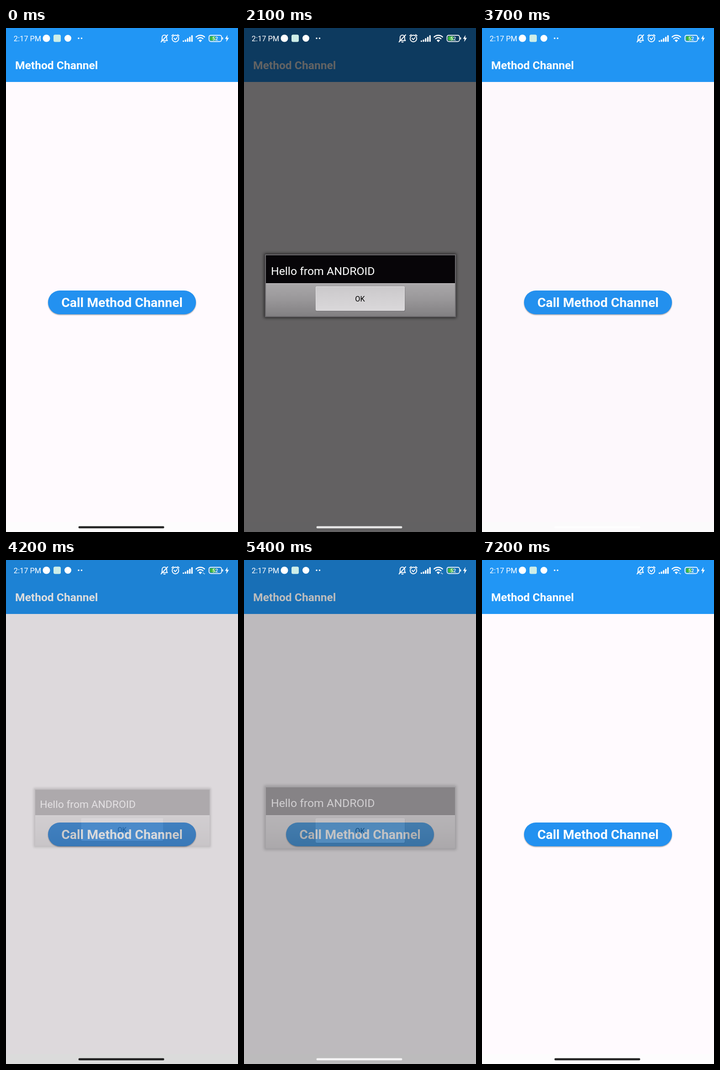
Recreate the animation shown at these times as an HTML page. Size 508 by 1102 pixels, loop 7.5 s.

```html
<!DOCTYPE html>
<html lang="en">
<head>
<meta charset="utf-8">
<title>Method Channel</title>
<style>
  html, body { margin: 0; width: 100%; height: 100%; overflow: hidden; background: #fffafe; }
  svg { display: block; width: 508px; height: 1102px; font-family: Roboto, sans-serif; }
  .bold { font-weight: 700; fill: #fff; }
  .line { fill: none; stroke: #fff; stroke-width: 1.9; stroke-linecap: round; stroke-linejoin: round; }
</style>
</head>
<body>
<svg viewBox="0 0 508 1102">
  <defs>
    <linearGradient id="panel" x2="0" y2="1">
      <stop stop-color="#a9a7a9"/><stop offset=".45" stop-color="#9b999b"/><stop offset="1" stop-color="#828082"/>
    </linearGradient>
    <linearGradient id="key" x2="0" y2="1">
      <stop stop-color="#cbc9cb"/><stop offset="1" stop-color="#dad8da"/>
    </linearGradient>
    <filter id="soft" x="-10%" y="-20%" width="120%" height="140%"><feGaussianBlur stdDeviation="3"/></filter>
    <filter id="lift" x="-5%" y="-20%" width="110%" height="150%"><feGaussianBlur stdDeviation="1"/></filter>
  </defs>

  <!-- app page -->
  <rect width="508" height="1102" fill="#fffafe"/>
  <rect y="1080" width="508" height="22" fill="#fdfcfd"/>
  <rect width="508" height="118" fill="#2196f5"/>
  <text class="bold" x="20" y="89.5" font-size="24.6">Method Channel</text>
  <rect x="92" y="575.5" width="324" height="52" rx="26" opacity=".35" filter="url(#lift)"/>
  <rect x="92" y="574" width="324" height="52" rx="26" fill="#2391f0"/>
  <rect id="press" x="92" y="574" width="324" height="52" rx="26" fill="#6750a4"/>
  <text class="bold" x="254" y="609.5" font-size="28.46" text-anchor="middle">Call Method Channel</text>
  <rect id="dim" width="508" height="1102"/>

  <g id="dialog">
    <rect x="44" y="493" width="421" height="141" opacity=".6" filter="url(#soft)"/>
    <rect x="46" y="495" width="418" height="137" rx="1" fill="#6d6b6e"/>
    <rect x="48" y="497" width="414" height="61" fill="#070508"/>
    <rect x="48" y="558" width="414" height="72" fill="url(#panel)"/>
    <rect x="48" y="558" width="414" height="1.2" fill="#c6c4c6"/>
    <text x="59" y="540" font-size="24.8" fill="#fff">Hello from ANDROID</text>
    <rect x="157" y="566" width="195.5" height="53.5" rx="2" fill="#5f5d60"/>
    <rect x="157.5" y="565.5" width="194" height="52.5" rx="1.5" fill="url(#key)" stroke="#e2e0e2"/>
    <text x="254" y="598" font-size="16.2" text-anchor="middle">OK</text>
  </g>

  <!-- status bar -->
  <g fill="#fff">
    <text x="16.8" y="29" font-size="16.4">2:17 PM</text>
    <circle cx="88.5" cy="22.5" r="8"/>
    <rect x="104" y="14.5" width="16" height="16" rx="3.5" fill="#cdeee8"/>
    <circle cx="135.5" cy="22.5" r="7.5"/>
    <circle cx="159" cy="22.5" r="1.7"/><circle cx="165.5" cy="22.5" r="1.7"/>

    <g class="line">
      <path d="M341 27.5h12.5l-1.7-2.5v-4.5a5 5 0 0 0-10 0V25zM354 15l-14.5 15.500"/>
      <path d="M345.500 30.700h3" />
      <circle cx="371" cy="23" r="7.200"/>
      <path d="M363 17l3.200-2.600M379 17l-3.200-2.600M368 22.500l2.800 3 3.600-4.500"/>
    </g>
    <g id="signal"></g>
    <g class="line" stroke-width="2.4">
      <path d="M416.300 19.600a13.500 13.500 0 0 1 18.400 0M419.800 23.300a8.300 8.300 0 0 1 11.400 0" style="stroke-width:2.500"/>
    </g>
    <path d="M425.500 31l-3.700-4a5.400 5.400 0 0 1 7.400 0z"/>
    <path id="traffic" d="M430.300 29.500l1.700-2.500 1.700 2.500zM432.700 29.200h3.400l-1.700 2.500z"/>
    <rect x="444.500" y="15.800" width="27.500" height="13.800" rx="4" fill="none" stroke="#fff" stroke-width="1.700"/>
    <rect x="473.300" y="20.300" width="2" height="5" rx="1"/>
    <path d="M449 18h9.500v9.400H449a2.300 2.300 0 0 1-2.300-2.300v-4.800A2.300 2.300 0 0 1 449 18z" fill="#3fb63c"/>
    <text x="458" y="26.700" font-size="11" font-weight="500" text-anchor="middle">52</text>
    <path d="M485 15.200l-5.300 8.600h3.400l-1 6.600 5.900-8.900h-3.700z"/>
  </g>
  <rect id="pill" x="158.500" y="1089.300" width="188" height="4.800" rx="2.400" fill-opacity=".83"/>
</svg>
<script>
  const LOOP = 7500, STEP = 100;
  const visits = [
    { press: 1400, open: 1450, close: 3550 },
    { press: 4100, open: 4180, close: 5350 }
  ];
  const $ = id => document.getElementById(id);
  const ramp = (t, start, length) => Math.min(1, Math.max(0, (t - start) / length));
  const easeOut = p => 1 - (1 - p) ** 3;
  const smooth = p => p * p * (3 - 2 * p);
  const during = (t, from, to, value) => t >= from && t < to ? value : 0;

  $('signal').innerHTML = [3, 5, 8, 11, 14.5].map((h, i) =>
    `<rect x="${386.8 + i * 4.7}" y="${30.3 - h}" width="3.200" height="${h}" rx="1.300"/>`).join('');

  function draw(t) {
    let dim = 0, dialog = 0, scale = 1, light = 0, press = 0;
    for (const v of visits) {
      const shown = easeOut(ramp(t, v.open, 250));
      dim += shown - easeOut(ramp(t, v.close, 200));
      dialog += shown - easeOut(ramp(t, v.close, 150));
      if (t < v.close) scale = during(t, v.open, v.close, 0.9 + 0.1 * shown) || scale;
      light += smooth(ramp(t, v.open + 150, 300)) - smooth(ramp(t, v.close + 150, 250));
      press += during(t, v.press, v.open + 250, 0.12);
    }
    $('dim').style.opacity = 0.61 * dim;
    $('dialog').style.opacity = dialog;
    $('dialog').setAttribute('transform', `translate(254 563) scale(${scale}) translate(-254 -563)`);
    $('press').style.opacity = press;
    const grey = Math.round(255 * light);
    $('pill').setAttribute('fill', `rgb(${grey},${grey},${grey})`);
    $('traffic').style.opacity = t >= 4000 ? 0.75 : 0;
  }

  const began = performance.now();
  function tick() {
    const t = (performance.now() - began) % LOOP;
    draw(Math.floor(t / STEP) * STEP);
    requestAnimationFrame(tick);
  }
  tick();
</script>
</body>
</html>
```
